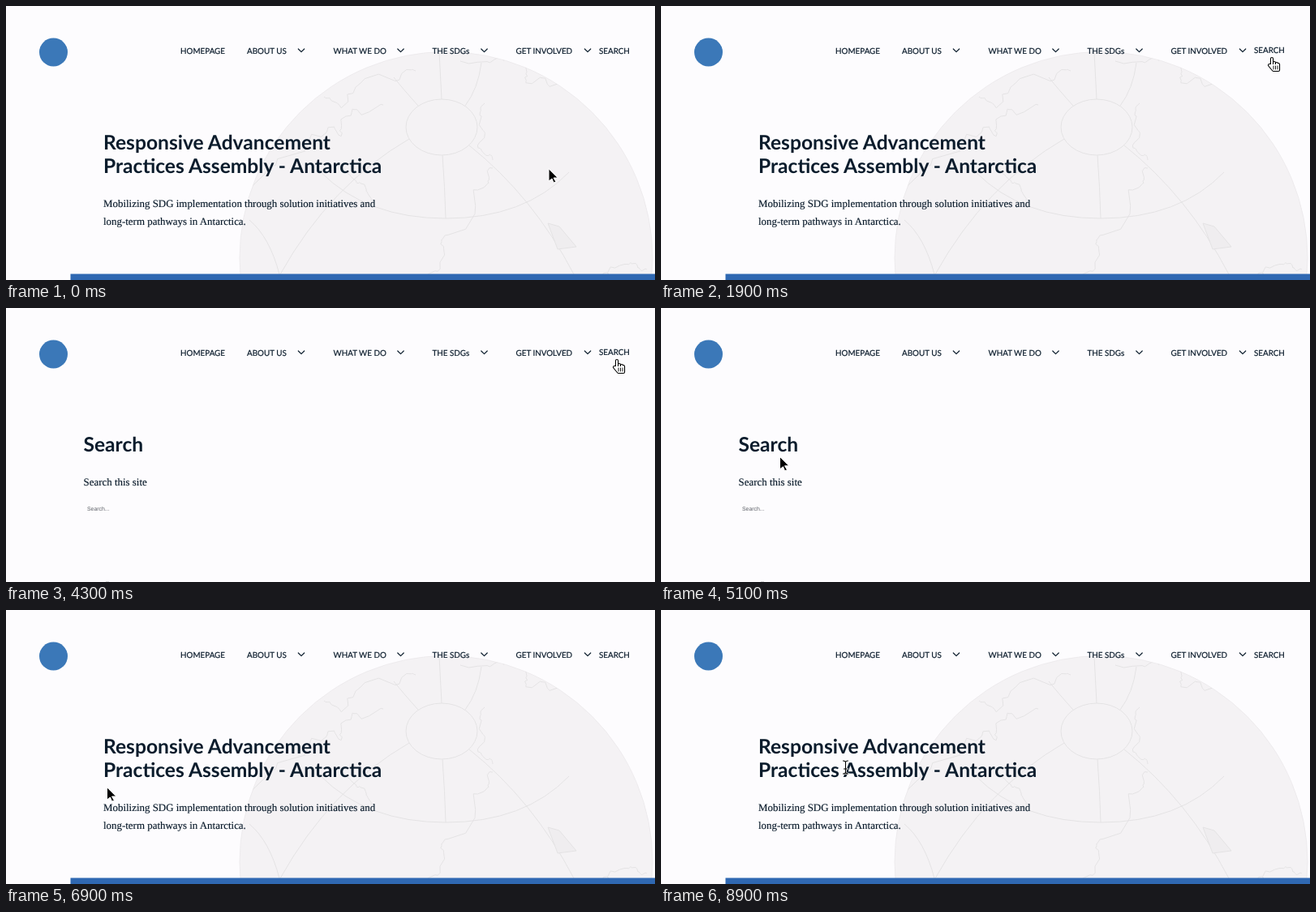
These frames come from a looping animation (800 px wide and 338 px high, 9 s). An HTML page:

```html
<!DOCTYPE html>
<html lang="en">
<head>
<meta charset="utf-8">
<title>Site search</title>
<style>
  html, body { margin: 0; width: 100%; height: 100%; overflow: hidden; background: #fdfcfe; }
  svg { display: block; width: 100%; height: 100%; }
  text { fill: #0b1c2c; text-rendering: geometricPrecision; }
  .nav { font: 9.85px Lato, sans-serif; stroke: #0b1c2c; stroke-width: .2; }
  .title { font: bold 24.6px Lato, sans-serif; }
  .body { font: 12.93px "Liberation Serif", serif; stroke: #0b1c2c; stroke-width: .15; }
  .hint { font: 6.9px "Liberation Sans", sans-serif; fill: #5c5f66; }
  .lines { fill: none; stroke: #e3e1e3; stroke-width: .9; stroke-linejoin: round; }
  .chevron { fill: none; stroke: #0b1c2c; stroke-width: 1.2; stroke-linecap: round; stroke-linejoin: round; }
</style>
</head>
<body>
<svg viewBox="0 0 800 338">
  <defs>
    <clipPath id="disc"><circle cx="542.5" cy="311" r="254.5"/></clipPath>
    <path id="beamShape" d="M-3 -8Q0 -8 0 -6Q0 -8 3 -8M0 -6V6M-3 8Q0 8 0 6Q0 8 3 8M-2 2H2"/>
    <path id="handShape" d="M0 1V10M3 6V10M6 7V10M8 8V10M-3 9L2 15H8V9H0Z"/>
  </defs>
  <g id="home">
    <circle cx="542.5" cy="311" r="254.5" fill="#f4f2f4" stroke="#ebe9eb" stroke-width=".8"/>
    <g class="lines" clip-path="url(#disc)">
      <ellipse cx="537" cy="149.5" rx="44" ry="34.5"/>
      <path d="M537 115L534 57M566 123Q582 102 586 70M508 123Q490 103 478 88"/>
      <path d="M497 164Q400 220 338 331M538 184Q541 224 542 262M571 172Q650 235 700 331"/>
      <path d="M388 205Q445 262 542 262T694 205M300 264Q325 285 337 331"/>
      <path d="M668 268L682 272 703 297 680 300Z" fill="#efedef"/>
      <g id="coasts"></g>
    </g>
    <rect x="79.5" y="330.5" width="721" height="8" fill="#2f68b2"/>
    <text class="title" x="120" y="176.8">Responsive Advancement</text>
    <text class="title" x="120" y="206.3">Practices Assembly - Antarctica</text>
    <text class="body" x="120" y="248.3">Mobilizing SDG implementation through solution initiatives and</text>
    <text class="body" x="120" y="270">long-term pathways in Antarctica.</text>
  </g>
  <g id="search">
    <text class="title" x="95.5" y="176.8">Search</text>
    <text class="body" x="95.5" y="219">Search this site</text>
    <text class="hint" x="100" y="250">Search...</text>
    <rect x="123" y="337" width="4" height="1" fill="#d5d5d8"/>
  </g>
  <circle cx="58.5" cy="57" r="17.5" fill="#3b78b8"/>
  <g id="nav"></g>
  <g id="cursor" fill="none" stroke-linejoin="round" stroke-linecap="round">
    <path id="arrow" d="M0 0V15L4 12 6 17 9 16 6 11H11Z" fill="#000" stroke="#fff"/>
    <g id="hand">
      <use href="#handShape" stroke="#000" stroke-width="4.2"/>
      <use href="#handShape" stroke="#fff" stroke-width="2" fill="#fff"/>
      <path d="M2 10v4M4.5 10v4M7 10v4" stroke="#000" stroke-width=".9"/>
    </g>
    <g id="beam">
      <use href="#beamShape" stroke="#fff" stroke-width="2.6"/>
      <use href="#beamShape" stroke="#000" stroke-width="1.1"/>
    </g>
  </g>
</svg>
<script>
const LOOP = 9000, STEP = 100;
const $ = id => document.getElementById(id);
const show = (id, on) => $(id).setAttribute('display', on ? 'inline' : 'none');
const move = (el, x, y) => el.setAttribute('transform', `translate(${x} ${y})`);
const add = (parent, tag, attrs, text = '') => {
  const el = document.createElementNS('http://www.w3.org/2000/svg', tag);
  for (const key in attrs) el.setAttribute(key, attrs[key]);
  el.textContent = text;
  return parent.appendChild(el);
};

// Navigation: label, left edge, chevron centre
const labels = [
  ['HOMEPAGE', 215], ['ABOUT US', 297, 364], ['WHAT WE DO', 403.5, 486.5],
  ['THE SDGs', 525.5, 589.5], ['GET INVOLVED', 628.5, 717], ['SEARCH', 731]
].map(([label, x, chevron]) => {
  if (chevron) add($('nav'), 'path', { class: 'chevron', d: `M${chevron - 3.7} 53l3.7 3.6 3.7-3.6` });
  return add($('nav'), 'text', { class: 'nav', x, y: 58.6 }, label);
});

// Coastlines: seeded midpoint displacement between two ends
let seed = 7;
const random = () => (seed = seed * 16807 % 2147483647) / 2147483647 - .5;
function coast(a, b, depth = 5) {
  if (!depth) return [b];
  const size = Math.hypot(b[0] - a[0], b[1] - a[1]) * .6;
  const middle = a.map((v, i) => (v + b[i]) / 2 + random() * size);
  return [...coast(a, middle, depth - 1), ...coast(middle, b, depth - 1)];
}
const ends = [
  [[392, 112], [505, 80]], [[560, 68], [680, 96]], [[590, 120], [600, 190]],
  [[300, 232], [465, 122]], [[415, 200], [450, 240]], [[600, 200], [520, 331]],
  [[735, 331], [790, 325]]
];
for (const [a, b] of ends) add($('coasts'), 'polyline', { points: [a, ...coast(a, b)].join(' ') });

// Pointer legs, eased: start time, end time, destination
const origin = [669, 201];
const legs = [
  [0, 900, 748, 53], [900, 1100, 753, 64], [4300, 5200, 125, 188],
  [5300, 5700, 234, 63], [6500, 6900, 124.5, 219], [7000, 7700, 227.5, 194]
];
const ease = u => u * u * (3 - 2 * u);
const pointer = t => legs.reduce(([x, y], [from, to, toX, toY]) => {
  const k = ease(Math.min(1, Math.max(0, (t - from) / (to - from))));
  return [x + (toX - x) * k, y + (toY - y) * k];
}, origin);

const within = (el, x, y, pad) => {
  const box = el.getBBox();
  return x >= box.x && x <= box.x + box.width && y >= box.y - pad && y <= box.y + box.height + pad;
};

function draw(now) {
  const t = Math.floor(now % LOOP / STEP) * STEP;
  const [x, y] = pointer(t);
  const searching = t >= 3300 && t < 6700;
  show('home', !searching);
  show('search', searching);
  const hovered = labels.find(label => within(label, x, y, 8));
  const paragraphs = [...$(searching ? 'search' : 'home').querySelectorAll('text')];
  const overText = paragraphs.some(text => within(text, x, y, 0));
  labels.forEach(label => move(label, 0, label === hovered ? -1 : 0));
  show('hand', hovered);
  show('beam', !hovered && overText);
  show('arrow', !hovered && !overText);
  move($('cursor'), x, y);
}
const start = performance.now();
(function tick() {
  draw(performance.now() - start);
  requestAnimationFrame(tick);
})();
</script>
</body>
</html>
```
